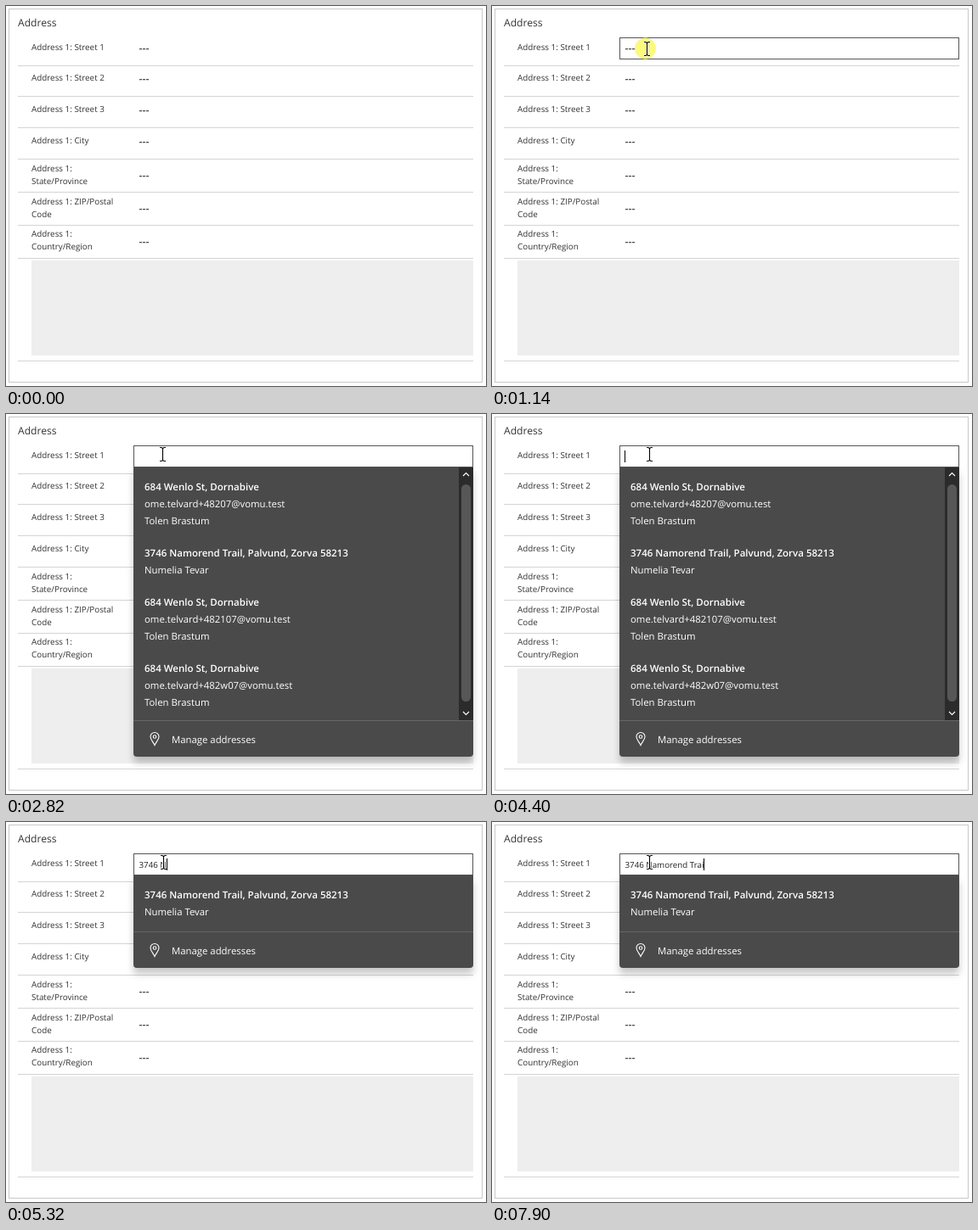
Animation of 565 by 448 pixels, one loop 8000 ms. Source, as an HTML page:

```html
<!DOCTYPE html>
<html lang="en">
<head>
<meta charset="utf-8">
<title>Address form</title>
<style>
html, body { margin: 0; width: 100%; height: 100%; overflow: hidden; background: #fff; }
svg { display: block; width: 565px; height: 448px; }
text { font: 9.85px "Open Sans", "Noto Sans", sans-serif; fill: #333; white-space: pre; text-rendering: geometricPrecision; }
.title { font-size: 12.1px; }
.dash { font-size: 12.4px; font-weight: 600; fill: #444; }
.typed { font-size: 9.75px; fill: #222; }
.item { font-size: 11.35px; fill: #fff; }
.bold { font-size: 11.5px; font-weight: 600; fill: #fff; }
.panel { fill: #4a4a4a; filter: drop-shadow(0 7px 4px rgba(0, 0, 0, .22)); }
.icon { fill: none; stroke: #fff; stroke-width: 1.1; }
</style>
</head>
<body>
<svg id="stage" viewBox="0 0 565 448"></svg>
<script>
const NS = "http://www.w3.org/2000/svg";
const stage = document.getElementById("stage");
const LOOP = 8000;

function add(parent, tag, attrs, text) {
  const el = document.createElementNS(NS, tag);
  for (const key in attrs) el.setAttribute(key, attrs[key]);
  if (text) el.textContent = text;
  parent.appendChild(el);
  return el;
}
const rect = (parent, x, y, width, height, fill, more) =>
  add(parent, "rect", { x, y, width, height, fill, ...more });
const label = (parent, x, y, text, cls = "") => add(parent, "text", { x, y, class: cls }, text);
const show = (el, on) => el.setAttribute("visibility", on ? "visible" : "hidden");

// Form: label lines, baseline of the first, dash baseline, divider
const rows = [
  [["Address 1: Street 1"], 52, 54, 70],
  [["Address 1: Street 2"], 88, 90, 106],
  [["Address 1: Street 3"], 125, 127, 143],
  [["Address 1: City"], 162, 164, 180],
  [["Address 1:", "State/Province"], 195, 204, 219],
  [["Address 1: ZIP/Postal", "Code"], 234, 243, 258],
  [["Address 1:", "Country/Region"], 272, 282, 297]
];
rect(stage, 3.5, 3.5, 557, 440, "#fff", { stroke: "#c8c8c8" });
label(stage, 14, 24, "Address", "title");
const dashes = rows.map(([lines, y, dashY, divider]) => {
  lines.forEach((line, i) => label(stage, 30, y + i * 15, line));
  rect(stage, 14, divider, 536, 1, "#d4d4d4");
  return label(stage, 156.5, dashY, "---", "dash");
});
rect(stage, 30, 300, 520, 112, "#eee");
rect(stage, 14, 418, 536, 1, "#d4d4d4");

const field = rect(stage, 150.5, 37.5, 399, 25, "none", { stroke: "#555" });
const halo = add(stage, "circle", { cx: 180.5, cy: 50, r: 12.5, fill: "#fcf97f" });
dashes[0].remove();
stage.appendChild(dashes[0]);
const typed = label(stage, 156.5, 54, "", "typed");
const caret = rect(stage, 156, 43, 1, 14, "#000");

// Suggestion panel
function panel(bottom, split, entries) {
  const g = add(stage, "g", {});
  add(g, "path", { class: "panel", d: `M150 63H550V${bottom - 4}q0 4-4 4H154q-4 0-4-4Z` });
  let y = 90;
  for (const lines of entries) {
    lines.forEach((line, i) => label(g, 163, y + i * 20, line, i ? "item" : "bold"));
    y += lines.length * 20 + 18;
  }
  rect(g, 150, split, 400, 1, "#666");
  const mid = split + 22;
  add(g, "path", {
    class: "icon",
    d: `M175 ${mid + 7.5}C173.5 ${mid + 4} 170 ${mid + 1} 170 ${mid - 2.5}a5 5 0 0 1 10 0C180 ${mid + 1} 176.5 ${mid + 4} 175 ${mid + 7.5}Z`
  });
  add(g, "circle", { class: "icon", cx: 175, cy: mid - 2.5, r: 1.8 });
  label(g, 195, split + 27, "Manage addresses", "item");
  return g;
}
const home = tag => ["684 Wenlo St, Dornabive", `ome.telvard+${tag}@vomu.test`, "Tolen Brastum"];
const trail = ["3746 Namorend Trail, Palvund, Zorva 58213", "Numelia Tevar"];
const full = panel(404, 361, [home("48207"), trail, home("482107"), home("482w07")]);
rect(full, 533, 63, 17, 298, "#2b2b2b");
rect(full, 536, 83, 11, 256, "#575757", { rx: 5.5 });
add(full, "path", { class: "icon", d: "M538 73l3.5-3.5 3.5 3.5M538 351l3.5 3.5 3.5-3.5" });
const short = panel(172, 129, [trail]);

// Pointer shapes
const arrow = add(stage, "path", {
  d: "M0 0V16L3.7 12.5 6.2 18.3 8.5 17.3 6 11.6H11.2Z", fill: "#fff", stroke: "#000", "stroke-width": 1
});
const beam = add(stage, "g", {});
const beamPath = "M-3-7.5H-1L.5-6.5 2-7.5H4M.5-6.5V7.5M-3 8.5H-1L.5 7.5 2 8.5H4";
for (const [stroke, width] of [["#fff", 2.6], ["#000", 1.1]])
  add(beam, "path", { d: beamPath, fill: "none", stroke, "stroke-width": width });

const phrase = "3746 Namorend Trai";
const keys = [4580, 4710, 4760, 4820, 5070, 5320, 5700, 6210, 6330, 6460, 6530, 6650, 6780, 6900, 7470, 7770, 7830, 7900];
const blinks = [1190, 1750, 2310, 2820, 3320, 3830, 4400];
const rests = [[0, 182, 50], [1750, 183, 50], [1930, 183, 49], [2060, 184, 47], [3320, 186, 47], [3380, 185, 47]];

const passed = (times, t) => times.filter(at => at <= t).length;
const ease = p => p * p * (3 - 2 * p);

function pointer(t) {
  if (t >= 1000) return rests.filter(r => r[0] <= t).pop().slice(1);
  const p = ease(Math.max(0, (t - 240) / 760));
  return [140 + 42 * p * p, 446 - 396 * p];
}

function draw(t) {
  const [x, y] = pointer(t);
  const inField = x > 150 && y < 63;
  const move = `translate(${x} ${y})`;
  arrow.setAttribute("transform", move);
  beam.setAttribute("transform", move);
  show(arrow, t >= 240 && !inField);
  show(beam, inField);
  show(field, inField);
  show(halo, t >= 1070 && t < 1250);
  show(dashes[0], t < 1190);
  show(full, t >= 1190 && t < 4580);
  show(short, t >= 4580);

  typed.textContent = phrase.slice(0, passed(keys, t));
  caret.setAttribute("x", Math.round(156.4 + typed.getComputedTextLength()));
  show(caret, passed(blinks, t) % 2 === 1);
}

const start = performance.now();
function tick() {
  draw((performance.now() - start) % LOOP);
  requestAnimationFrame(tick);
}
tick();
</script>
</body>
</html>
```
